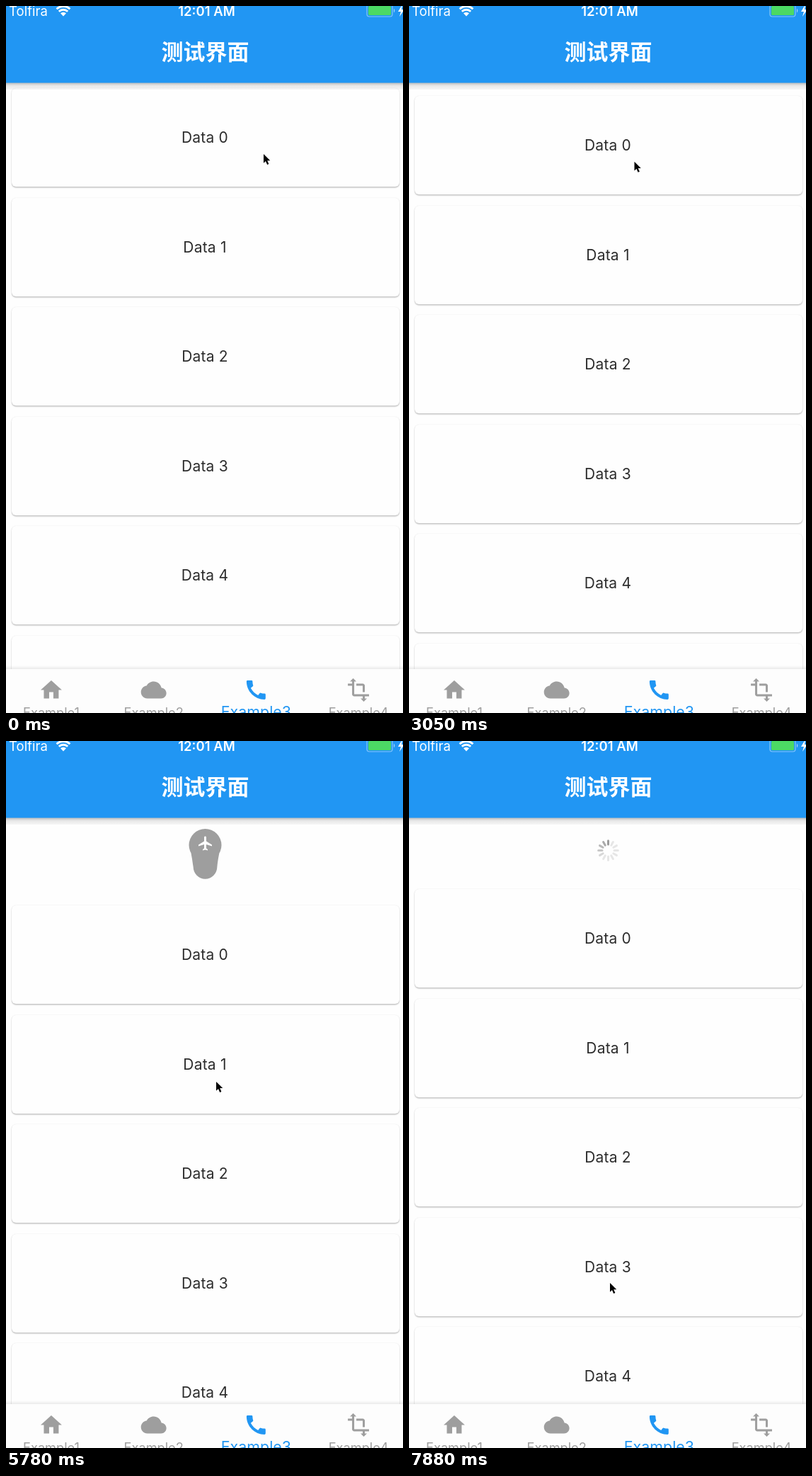
Recreate the animation shown at these times as an HTML page. Size 561 by 998 pixels, loop 8000 ms.

```html
<!DOCTYPE html>
<html lang="zh-CN">
<head>
<meta charset="utf-8">
<title>Pull to refresh</title>
<style>
  html, body { margin: 0; width: 100%; height: 100%; overflow: hidden; background: #fdfdfd; }
  #stage { position: relative; width: 561px; height: 998px; overflow: hidden; background: #fefefe; font-family: Inter, Roboto, sans-serif; }
  svg, #list { position: absolute; left: 0; top: 0; }
  #list { width: 561px; height: 998px; }
  .card {
    position: absolute; left: 8px; width: 548px; height: 139px; border-radius: 6px;
    background: #fefefe; color: #2c2c2c; text-align: center; font-size: 21px; line-height: 139px;
    letter-spacing: .2px; text-indent: -2px;
    box-shadow: 0 1.5px 1.8px rgba(0, 0, 0, .23), 0 0 1.5px rgba(0, 0, 0, .1);
  }
  .title { font: 700 31px "Noto Sans CJK SC", "Noto Sans CJK", "Noto Sans CJK JP", sans-serif; }
  text { text-anchor: middle; }
</style>
</head>
<body>
<div id="stage">
  <svg width="561" height="998">
    <g id="drop">
      <path id="blob" fill="#9e9e9e"/>
      <path fill="#fff" transform="translate(-11.5 -14.5)" d="M21 16v-2l-8-5V3.5c0-.83-.67-1.5-1.5-1.5S10 2.67 10 3.5V9l-8 5v2l8-2.5V19l-2 1.5V22l3.5-1 3.5 1v-1.5L13 19v-5.5l8 2.5z"/>
    </g>
    <g id="spinner" transform="translate(281.5 154.5)" stroke="#8a8a8a" stroke-width="3" stroke-linecap="round"/>
  </svg>

  <div id="list"></div>

  <svg width="561" height="998">
    <defs>
      <linearGradient id="under" x2="0" y2="1">
        <stop offset="0" stop-opacity=".27"/>
        <stop offset=".45" stop-opacity=".09"/>
        <stop offset="1" stop-opacity=".03"/>
      </linearGradient>
      <linearGradient id="over" x2="0" y2="1">
        <stop offset="0" stop-opacity="0"/>
        <stop offset="1" stop-opacity=".08"/>
      </linearGradient>
    </defs>

    <rect y="108" width="561" height="10" fill="url(#under)"/>
    <rect width="561" height="108.5" fill="#2196f3"/>
    <g fill="#fff">
      <text x="31.5" y="14" font-size="18.5">Tolfira</text>
      <text x="283.5" y="14" font-size="18.5" font-weight="600">12:01 AM</text>
      <text class="title" x="281.5" y="76">测试界面</text>
      <path d="M81 14.5l-4-4.2a5.8 5.8 0 0 1 8 0z"/>
      <path d="M74.8 7.8a9 9 0 0 1 12.4 0M71.6 4.2a13.6 13.6 0 0 1 18.8 0" fill="none" stroke="#fff" stroke-width="2.9"/>
      <path d="M548 3.5q2.6 3 0 6z" opacity=".6"/>
      <path d="M560 -2l-6 10h4l-2 7 7-10h-4z"/>
    </g>
    <rect x="510" y="-2" width="36" height="17" rx="3.5" fill="none" stroke="#fff" stroke-opacity=".45" stroke-width="1.2"/>
    <rect x="512" y="0" width="32" height="13" rx="1.5" fill="#4cd964"/>

    <rect y="931" width="561" height="5" fill="url(#over)"/>
    <rect y="936" width="561" height="62" fill="#fdfdfd"/>
    <g id="nav"></g>
    <g id="cursor">
      <path transform="scale(.9)" d="M0 0v14.2l3.3-3.1 2.4 5.5 2.5-1.1-2.4-5.3h4.5z" stroke="#fff" stroke-width="1.2" paint-order="stroke"/>
    </g>
  </svg>
</div>
<script>
const $ = id => document.getElementById(id);
const LOOP = 8000, PITCH = 154.6, R = 23, HEADER = 93.5, STEP = 140;
const RELEASE = 6690, LOADING = 7300;

const clamp = (v, lo, hi) => Math.min(hi, Math.max(lo, v));
const linear = s => s;
const easeIn = p => s => s ** p;
const easeOut = p => s => 1 - (1 - s) ** p;

// Key poses: time, pointer x, pointer y, list offset, easing from the pose before
const poses = [
  [0, 364, 209, 0],
  [550, 326, 182, 0, easeOut(2)],
  [1110, 299, 223, 0, linear],
  [1290, 299, 232, 4.6, easeIn(2)],
  [2320, 280, 421, 88, easeOut(1.5)],
  [3700, 324, 191, 0, easeOut(3)],
  [4220, 306, 209, 0, linear],
  [5010, 303, 343, 66.5, linear],
  [6570, 285, 759, 215.5, easeIn(1.4)],
  [7880, 284, 765, 93, easeOut(3)]
];

// Moves between poses in even steps, like a low screen refresh rate
function pose(t) {
  const i = poses.findIndex(p => p[0] > t);
  if (i < 0) return poses[poses.length - 1].slice(1, 4);
  const a = poses[i - 1], b = poses[i], span = b[0] - a[0];
  const steps = Math.round(span / STEP);
  const s = b[4](Math.floor((t - a[0]) / span * steps) / steps);
  return [1, 2, 3].map(k => a[k] + (b[k] - a[k]) * s);
}

// Round head with a tail that narrows as it stretches
function blob(len) {
  const w = R - len * .2, side = R - len * .1;
  return `M${-R} 0A${R} ${R} 0 0 0 ${R} 0A${R} ${R} 0 0 0 ${-R} 0Z` +
    `M${-R} 0C${-R} 0 ${-side} ${len / 5} ${-w} ${len}` +
    `A${w} ${w} 0 0 0 ${w} ${len}C${side} ${len / 5} ${R} 0 ${R} 0Z`;
}

$('list').innerHTML = Array.from({ length: 6 }, (_, i) =>
  `<div class="card" style="top:${116 + i * PITCH}px">Data ${i}</div>`).join('');

const icons = [
  'M10 20v-6h4v6h5v-8h3L12 3 2 12h3v8z',
  'M19.35 10.04C18.67 6.59 15.64 4 12 4 9.11 4 6.6 5.64 5.35 8.04 2.34 8.36 0 10.91 0 14c0 3.31 2.69 6 6 6h13c2.76 0 5-2.24 5-5 0-2.64-2.05-4.78-4.65-4.96z',
  'M20 15.4c-1.2 0-2.4-.2-3.5-.6a1 1 0 0 0-1 .2l-1.6 2c-2.8-1.4-5.5-3.9-6.9-6.8l2-1.7c.3-.3.4-.7.2-1-.4-1.1-.5-2.3-.5-3.5a1 1 0 0 0-1-1H4.2C3.6 3 3 3.2 3 4c0 9.3 7.7 17 17 17 .7 0 1-.6 1-1.2v-3.4a1 1 0 0 0-1-1z',
  'M22 18v-2H8V4h2L7 1 4 4h2v2H2v2h4v8c0 1.1.9 2 2 2h8v2h-2l3 3 3-3h-2v-2h4zM10 8h6v6h2V8c0-1.1-.9-2-2-2h-6v2z'
];
$('nav').innerHTML = icons.map((d, i) => {
  const x = 64 + i * 144.7, on = i === 2;
  return `<g fill="${on ? '#2196f3' : '#9e9e9e'}">
    <path transform="translate(${x - 18} 947.5) scale(1.496)" d="${d}"/>
    <text x="${x}" y="1004" font-size="${on ? 21.4 : 18.2}">Example${i + 1}</text></g>`;
}).join('');

$('spinner').innerHTML = Array.from({ length: 12 }, (_, i) =>
  `<path d="M0 -8.5V-13.8" transform="rotate(${i * 30})"/>`).join('');
const spokes = [...$('spinner').children];

function draw(t) {
  const [x, y, pull] = pose(t);
  const tail = clamp(pull - 85, 0, 77.5) * clamp(1 - (t - RELEASE) / 450, 0, 1);
  const loading = t >= LOADING;
  $('list').style.transform = `translateY(${pull}px)`;
  $('drop').setAttribute('transform', `translate(281.5 ${53.5 + Math.min(pull, HEADER)})`);
  $('drop').style.display = loading ? 'none' : '';
  $('blob').setAttribute('d', blob(tail));
  $('spinner').style.display = loading ? '' : 'none';
  const lead = Math.floor((t - LOADING) * 12 / 1000) + 6;
  spokes.forEach((spoke, i) => {
    const age = (lead - i + 12) % 12;
    spoke.style.opacity = Math.max(.2, .85 - age * .13);
  });
  $('cursor').setAttribute('transform', `translate(${x} ${y})`);
}

const start = performance.now();
function frame() {
  draw((performance.now() - start) % LOOP);
  requestAnimationFrame(frame);
}
frame();
</script>
</body>
</html>
```
